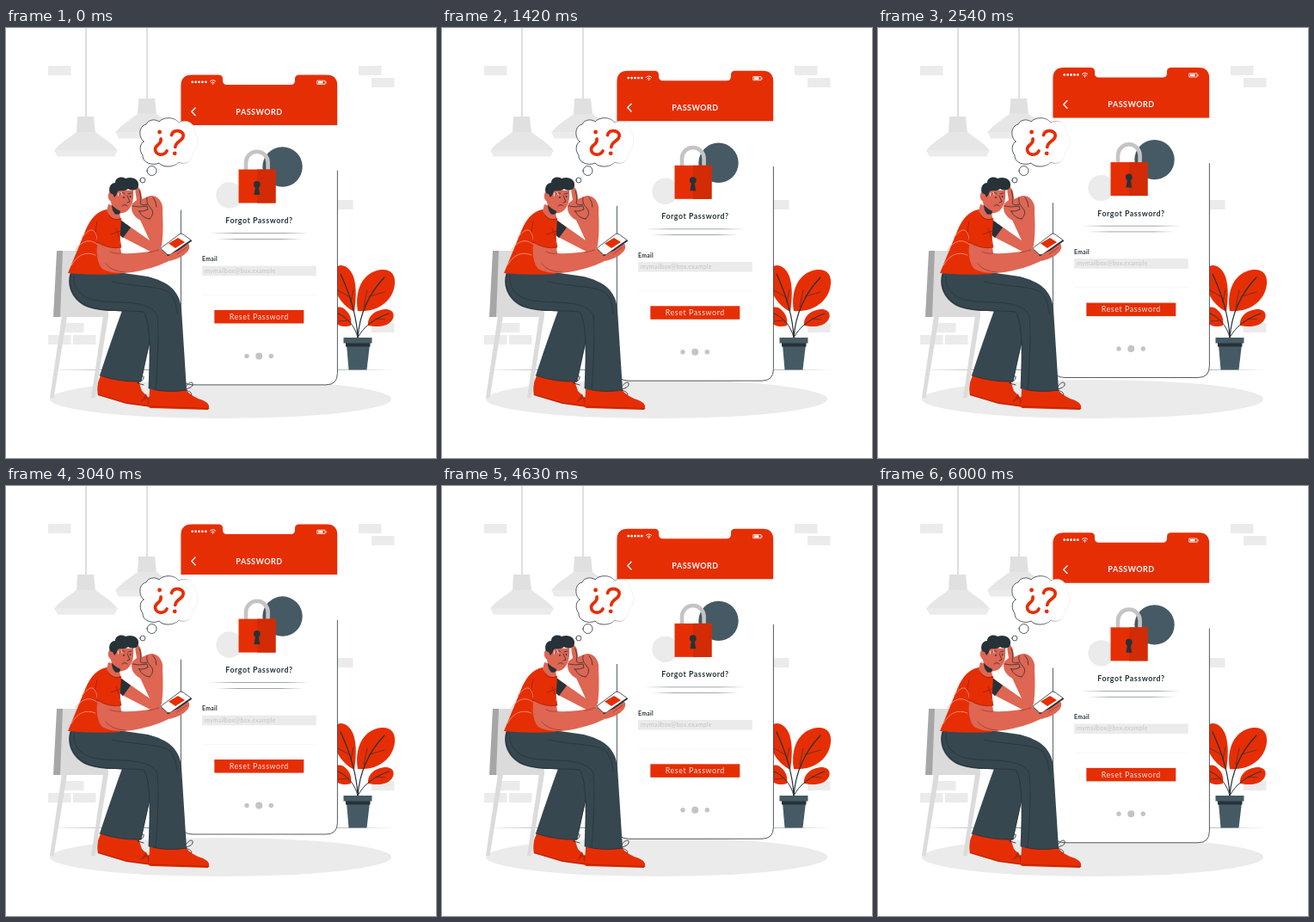
Write an HTML page with a canvas that moves like this. It is 500x500 px and loops after 6.04 s.

```html
<!DOCTYPE html>
<html lang="en">
<head>
<meta charset="utf-8">
<title>Forgot password</title>
<style>
html, body { margin: 0; width: 100%; height: 100%; overflow: hidden; background: #fff; }
canvas { display: block; width: 100vw; height: 100vh; }
</style>
</head>
<body>
<canvas id="stage"></canvas>
<script>
const LOOP = 6040, RISE = 10, SIZE = 500;
const RED = '#e62e05', INK = '#263238', SLATE = '#37474f', BLUE = '#455a64';
const SKIN = '#de6653', PALE = '#ebebeb', GREY = '#dbdbdb', MID = '#c4c4c4';
const canvas = document.getElementById('stage');
const ctx = canvas.getContext('2d');

function fill(d, color) {
  ctx.fillStyle = color;
  ctx.fill(new Path2D(d));
}

function line(d, color = INK, width = 0.8) {
  ctx.strokeStyle = color;
  ctx.lineWidth = width;
  ctx.stroke(new Path2D(d));
}

function shape(d, color, edge = INK, width = 0.8) {
  fill(d, color);
  line(d, edge, width);
}

function rect(x, y, w, h, color) {
  ctx.fillStyle = color;
  ctx.fillRect(x, y, w, h);
}

function oval(x, y, rx, ry, color) {
  ctx.beginPath();
  ctx.ellipse(x, y, rx, ry, 0, 0, Math.PI * 2);
  ctx.fillStyle = color;
  ctx.fill();
}

const dot = (x, y, r, color) => oval(x, y, r, r, color);

function label(str, x, y, size, weight, color, align, spacing) {
  ctx.font = `${weight} ${size}px Lato, "Open Sans", sans-serif`;
  ctx.letterSpacing = spacing + 'px';
  ctx.textAlign = align;
  ctx.fillStyle = color;
  ctx.fillText(str, x, y);
}

function fadeLine(x1, x2, y, height = 0.7) {
  const g = ctx.createLinearGradient(x1, 0, x2, 0);
  g.addColorStop(0, '#26323800');
  g.addColorStop(0.25, '#263238a0');
  g.addColorStop(0.75, '#263238a0');
  g.addColorStop(1, '#26323800');
  rect(x1, y, x2 - x1, height, g);
}

function lamp(x, y) {
  ctx.save();
  ctx.translate(x, y);
  rect(-0.5, -y, 1, y, '#c2c2c2');
  fill('M-10 0H9L11 19H-11Z', '#e0e0e0');
  fill('M-11 18H11C20 25 31 31 37 40H-37C-31 31 -20 25 -11 18Z', '#e6e6e6');
  fill('M-37 39H37L33 46.5H-33Z', PALE);
  ctx.restore();
}

function room() {
  [[49, 44], [410, 44], [425, 58], [377, 200], [64, 343], [49, 357], [78, 357], [425, 343]]
    .forEach(([x, y]) => rect(x, y, 26.5, 11, PALE));
  lamp(93, 103);
  lamp(164, 82);
  fadeLine(48, 453, 397.1, 0.8);
  oval(249.5, 431.5, 198.5, 22.5, PALE);
}

function plant() {
  fill('M405 330C388 322 376 300 383 279C388 273 399 276 404 289C408 301 407 316 405 330Z', RED);
  fill('M409 329C405 306 414 284 436 281C448 280 453 287 452 298C450 318 431 331 409 329Z', RED);
  fill('M401 346C393 349 381 346 379 335C379 324 389 321 396 329C401 334 402 340 401 346Z', RED);
  fill('M421 346C420 334 431 327 443 327C451 328 453 335 448 341C441 349 428 347 421 346Z', RED);
  line('M409 360C408 338 401 312 389 286M409 360C411 335 419 312 440 290', INK, 1.2);
  line('M409 360C406 347 397 336 384 331M409 360C416 347 428 338 445 332', INK, 1);
  line('M400 313L386 305M401 318L404 304M416 324L420 305M423 312L440 307M430 338L441 339M397 340L387 341', INK, 0.6);
  fill('M396 368H423L419.5 397.5H398.5Z', BLUE);
  rect(395, 366, 28.5, 4.5, INK);
  rect(392.5, 360, 33, 6.5, BLUE);
}

function padlock() {
  dot(321.5, 161.5, 23.2, BLUE);
  dot(259.5, 194.5, 15.2, PALE);
  line('M279 167V156.5A12.8 12.8 0 0 1 304.6 156.5V167', MID, 4.6);
  rect(270.5, 164.5, 43, 39, RED);
  rect(292, 164.5, 21.5, 39, '#d22b05');
  dot(291.8, 181.8, 3.9, INK);
  fill('M290.4 182H293.2L295.2 194H288.4Z', INK);
}

function statusBar() {
  for (let i = 0; i < 5; i++) dot(216.7 + i * 3.9, 62.8, 1.35, '#fff');
  line('M237.4 62Q240.5 59.2 243.6 62M238.8 63.6Q240.5 62 242.2 63.6', '#fff', 1);
  dot(240.5, 65, 0.8, '#fff');
  line('M362.2 61.2H371V65.4H362.2Z', '#fff', 0.8);
  rect(363, 62, 5.5, 2.6, '#fff');
  rect(371.6, 62.4, 1, 1.9, '#fff');
}

function phone(dy) {
  ctx.save();
  ctx.translate(0, dy);
  fill('M203.4 67Q203.4 54.5 216 54.5H373Q385.4 54.5 385.4 67V401.4Q385.4 414.9 372 414.9H217Q203.4 414.9 203.4 401.4Z', '#fff');
  line('M385.4 166V401.4Q385.4 414.9 372 414.9H217Q203.4 414.9 203.4 401.4V212', INK, 0.8);
  fill('M203.4 113V67Q203.4 54.5 216 54.5H247Q252 54.5 252 59V61Q252 66 257 66H331Q336 66 336 61V59Q336 54.5 341 54.5H373Q385.2 54.5 385.2 67V113Z', RED);
  statusBar();
  line('M220 93L215.8 97.3L220 101.6', '#fff', 1.4);
  label('PASSWORD', 294.5, 100.6, 9, 'bold', '#fff', 'center', 0.5);
  padlock();
  label('Forgot Password?', 294.5, 227, 8.8, 'bold', INK, 'center', 0.55);
  fadeLine(236, 353, 238.2);
  fadeLine(244, 345, 245);
  label('Email', 228, 271.3, 6.8, 'bold', INK, 'left', 0.3);
  rect(228, 276.6, 132.8, 11.6, PALE);
  label('mymailbox@box.example', 231, 284.6, 7, 'normal', '#c4c4c4', 'left', 0.25);
  rect(228, 309.8, 132.8, 0.7, '#f4f4f4');
  rect(242.3, 328, 104, 15.5, RED);
  label('Reset Password', 294.3, 338.9, 8.8, 'normal', '#ffe6df', 'center', 0.6);
  dot(280, 381.4, 2.7, MID);
  dot(294.2, 381.4, 4, MID);
  dot(308.3, 381.4, 2.7, MID);
  ctx.restore();
}

function bubble() {
  const edge = ctx.createLinearGradient(190, 0, 216, 0);
  edge.addColorStop(0, INK);
  edge.addColorStop(1, '#eeeeee');
  shape('M160 132C154 127 154 114 163 112C165 107 173 105 178 109C183 103 196 103 201 110C210 105 221 112 219 121C225 126 224 139 217 144C218 154 209 160 201 156C196 162 183 163 178 157C170 161 158 156 159 148C155 143 155 135 160 132Z', '#fff', edge, 0.8);
  shape('M164 166A5.5 5.5 0 1 1 175 166A5.5 5.5 0 1 1 164 166Z', '#fff');
  shape('M155.9 177A3 3 0 1 1 161.9 177A3 3 0 1 1 155.9 177Z', '#fff');
  line('M180 129C181.5 136 173.5 135 173.5 141C174 148.5 184 149 187 143', RED, 3.7);
  dot(178.6, 121, 2.4, RED);
  line('M192.5 124.5C194 118.5 203 118 206 123.5C208 131 197 131.5 196.8 138.5', RED, 3.7);
  dot(196.2, 145.8, 2.4, RED);
}

function chair() {
  fill('M65 335H71L55.5 430H51ZM113 335H119L103.5 430H99Z', GREY);
  fill('M65 259H91L119 331V336H62Z', GREY);
  fill('M59 259H66L63 336H55Z', '#a6a6a6');
}

function shoes() {
  fill('M110 404L107 412Q105.5 422 107 427L140 437L166 440.5Q170 437 166 430L158 422L154 410Z', RED);
  line('M107 426.5L140 436L166 439.5', '#9e2107', 0.7);
  fill('M163 425L166 440L168 428L156 436Z', '#b82605');
  fill('M167 420L166 440Q166 442 170 442L235 444Q239 437 228 432.5Q218 430 209 421Z', RED);
  line('M166 440L236 442.5', '#9e2107', 0.7);
  line('M207 420C212 411 218 410 217 415C216 419 210 419 208 421C213 422 218 425 215 427M153 413C156 404 161 403 160 407C159 411 155 411 153 413L160 415', INK, 0.9);
}

function legs() {
  fill('M136 326C127 350 117 380 109 404Q132 412 157 411L172 344L180 321Z', SLATE);
  line('M109 404Q132 412 157 411L172 341', INK, 0.8);
  fill('M75 284C69 300 78 319 96 325C116 331 137 329 160 330C168 342 168 376 166 419Q187 425 210 421L204 327C202 305 188 295 165 289L130 284Z', SLATE);
  line('M76 286C70 302 81 319 99 325C119 330 141 328 160 330C168 342 168 376 166 419Q187 425 210 421', INK, 0.8);
  line('M79 288C77 303 88 314 106 317C132 321 166 315 176 334C178 360 176 395 174 420M123 295C151 301 178 300 189 307C197 314 198 323 199 332', INK, 0.7);
}

function fist() {
  fill('M140 228L167 247L155 221L181 205C183 218 183 240 181 253Q178 262 168 260L135 243Z', SKIN);
  fill('M147 204C144 211 148 219 155 223Q169 230 180 221Q184 212 181 204C178 197 172 193 165 196L158 199C158 192 156 184 152 185C149 186 151 193 152 200Z', SKIN);
  line('M155 189Q158 198 156 204Q159 207 164 205M164 197C163 202 165 206 168 209Q174 215 167 222M147 207Q155 209 164 207L165 211Q159 214 154 213M155 213Q158 221 167 222M171 197Q175 202 175 208', INK, 0.8);
  fill('M132 222L145 232L136 244L130 239Z', INK);
}

function torso() {
  fill('M117 211C106 213 98 222 93 234L72 285Q101 288 132 286L132 253L134 222L127 211Z', RED);
  line('M106 249C107 262 109 272 117 282M119 215Q121 225 134 222M106 225Q102 238 107 248', '#8f1f06', 0.7);
  line('M88 244C97 232 104 231 106 246M81 258C92 242 105 244 119 267M76 276Q87 257 104 264', '#ff9b80', 0.8);
  fill('M119 205L117 213Q124 225 133 221L131 208Z', SKIN);
}

function head() {
  fill('M124 188C118 190 117 198 122 202L124 211Q130 218 139 214C146 210 149 201 148 189Z', SKIN);
  fill('M123 206Q128 211 133 213Q133 218 127 216.5Q123 212 123 206Z', INK);
  fill('M124 193C118 193 119 180 127 180C127 174 134 172 139 175C148 172 155 177 154 183C154 189 146 190 142 187C137 191 132 188 130 190Q129 194 126 197Z', INK);
  line('M133 193Q136 190 138 193M142 193L146 192M141 195L144 202L141 203M135 207Q138 204 141 207', INK, 0.8);
  dot(137, 197, 0.9, INK);
  dot(144.6, 196, 0.9, INK);
  line('M130.5 192V195M134 191L135 194', '#fff', 0.8);
}

function handset() {
  fill('M107 247C104 260 106 274 112 280C119 285 137 287 157 282Q180 277 196 267Q211 261 213 252L207 249L182 257Q157 263 134 262L133 254Z', SKIN);
  line('M116 274Q122 283 139 284M134 262Q126 263 121 260M166 261Q179 259 187 253', '#9e3429', 0.7);
  shape('M180 256L202 239.5Q204 238.5 206 240L215 246.5L191 263.5Q189 265 187 263Z', '#fff', INK, 0.8);
  line('M188 264.3L191 264.4L215.3 247.3', INK, 1.6);
  fill('M189 250.5L200 244L208 249L197 256Z', RED);
  fill('M188 266Q194 260 202 259L212 251Q215 256 210 261Q205 267 190 271Z', SKIN);
  line('M199 263L210 255', '#9e3429', 0.7);
  fill('M107 221Q119 217 128 233L134 255Q121 258 106 249Z', RED);
  line('M106 249Q121 258 134 255Q133 243 128 233M122 240L133 236', '#8f1f06', 0.7);
}

function draw(now) {
  const px = Math.round(innerWidth * devicePixelRatio);
  const py = Math.round(innerHeight * devicePixelRatio);
  if (canvas.width !== px || canvas.height !== py) {
    canvas.width = px;
    canvas.height = py;
  }
  ctx.setTransform(px / SIZE, 0, 0, py / SIZE, 0, 0);
  ctx.lineCap = ctx.lineJoin = 'round';
  rect(0, 0, SIZE, SIZE, '#fff');

  // steady rise, then steady fall
  const phase = (now % LOOP) / LOOP;
  const dy = -RISE * (1 - Math.abs(1 - 2 * phase));

  room();
  plant();
  phone(dy);
  bubble();
  chair();
  shoes();
  legs();
  fist();
  torso();
  head();
  handset();
}

const start = performance.now();
function tick() {
  draw(performance.now() - start);
  requestAnimationFrame(tick);
}
tick();
</script>
</body>
</html>
```
